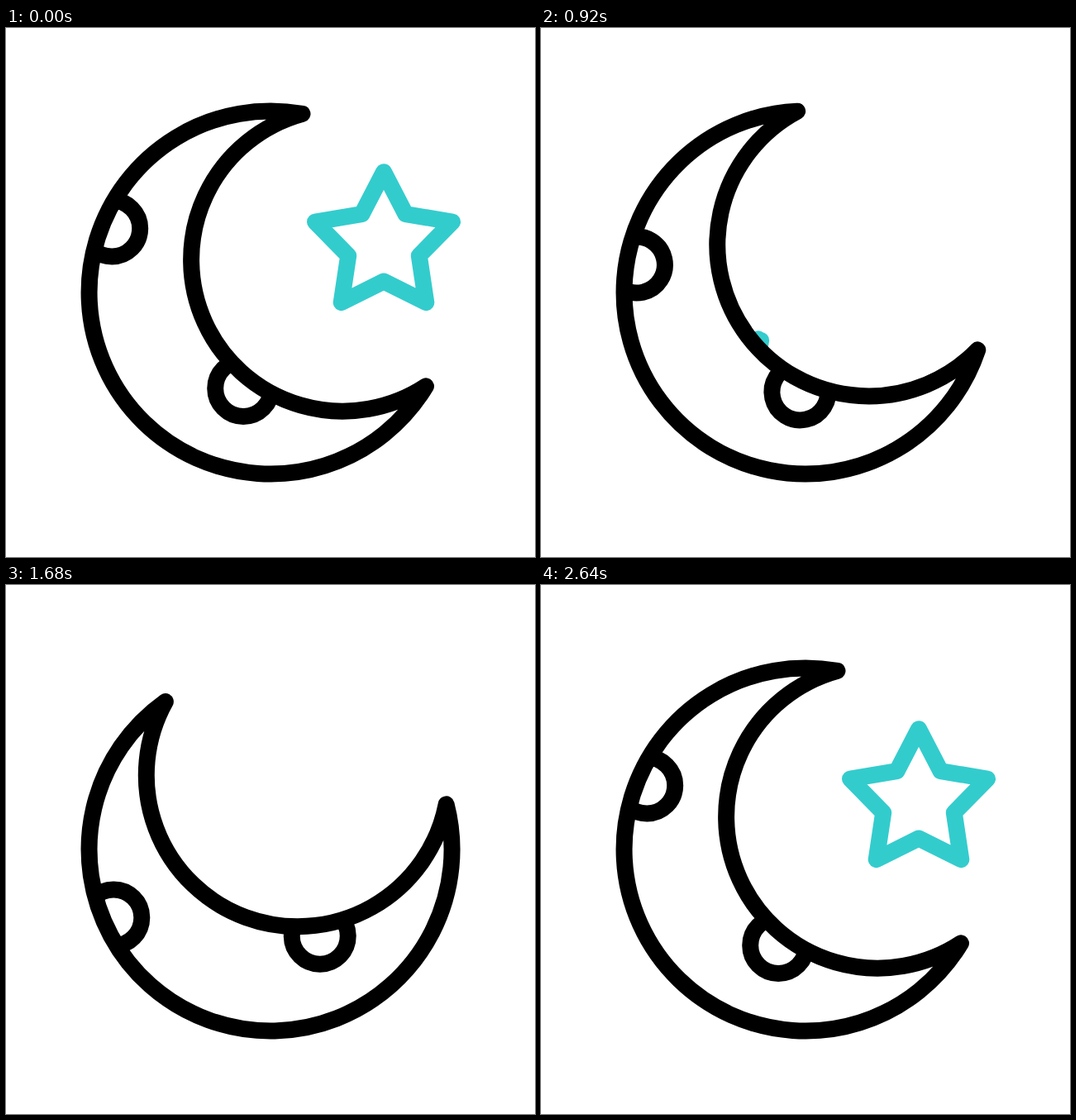
An HTML page that plays this animation: 640x640 px, repeating every 3 s.

```html
<!DOCTYPE html>
<html lang="en">
<head>
<meta charset="utf-8">
<title>Moon and star</title>
<style>
  html, body { margin: 0; height: 100%; overflow: hidden; background: #fff; }
  svg { display: block; width: 100%; height: 100%; }
  .line { fill: none; stroke: #000; stroke-width: 20; stroke-linejoin: round; }
</style>
</head>
<body>
<svg viewBox="0 0 640 640">
  <defs>
    <path id="crescent" d="M358.5 103.9A219.5 219.5 0 1 0 508 433.4A183.15 183.15 0 1 1 358.5 103.9Z"/>
    <clipPath id="inside"><use href="#crescent"/></clipPath>
  </defs>
  <g id="moon">
    <polygon id="star" class="line" style="stroke:#33cccd"/>
    <use href="#crescent" fill="#fff"/>
    <g class="line" clip-path="url(#inside)">
      <circle cx="128.2" cy="242.5" r="34"/>
      <circle cx="287.2" cy="436" r="34"/>
    </g>
    <use href="#crescent" class="line"/>
  </g>
</svg>
<script>
const LOOP = 3000;
const moon = document.getElementById('moon');
const star = document.getElementById('star');

// Cubic Bezier easing (.32, 0, .22, 1), solved by bisection
function ease(x) {
  const bezier = (s, a, b) => 3 * (1 - s) ** 2 * s * a + 3 * (1 - s) * s * s * b + s ** 3;
  let low = 0, high = 1;
  for (let i = 0; i < 24; i++) {
    const mid = (low + high) / 2;
    if (bezier(mid, .32, .22) < x) low = mid; else high = mid;
  }
  return bezier(low, 0, 1);
}

// Eased value at time t between [time, value] keys
function track(t, keys) {
  if (t <= keys[0][0]) return keys[0][1];
  for (let i = 1; i < keys.length; i++) {
    const [t0, v0] = keys[i - 1], [t1, v1] = keys[i];
    if (t < t1) return v0 + (v1 - v0) * ease((t - t0) / (t1 - t0));
  }
  return keys[keys.length - 1][1];
}

// The star leans out, dives behind the moon, and later comes back
const starTrack = (t, rest, lean, enter, exit) => track(t,
  [[200, rest], [520, lean], [1032, enter], [1500, enter], [1501, exit], [1960, exit], [2600, rest]]);

function starPoints(cx, cy, size, turn) {
  return Array.from({ length: 10 }, (_, i) => {
    const radius = size * (i % 2 ? 45 : 87.3);
    const angle = (turn - 90 + i * 36) * Math.PI / 180;
    return [cx + radius * Math.cos(angle), cy + radius * Math.sin(angle)].map(v => v.toFixed(2));
  }).join(' ');
}

function draw(now) {
  const t = now % LOOP;
  const turn = track(t, [[600, 0], [900, -13], [2198, 360]]);
  const pulse = track(t, [[1960, 1], [2200, 1.043], [2460, 1]]);
  moon.setAttribute('transform',
    `translate(320 320) rotate(${turn}) scale(${pulse}) translate(-320 -320)`);

  const size = starTrack(t, 1, 1.132, 0, 0);
  star.style.visibility = size > 0.0005 ? 'visible' : 'hidden';
  star.setAttribute('points', starPoints(
    starTrack(t, 457, 470.7, 245, 238),
    starTrack(t, 261.5, 253.7, 369, 352),
    size,
    starTrack(t, 0, 7.8, -144, -144)));
  requestAnimationFrame(draw);
}
requestAnimationFrame(draw);
</script>
</body>
</html>
```
